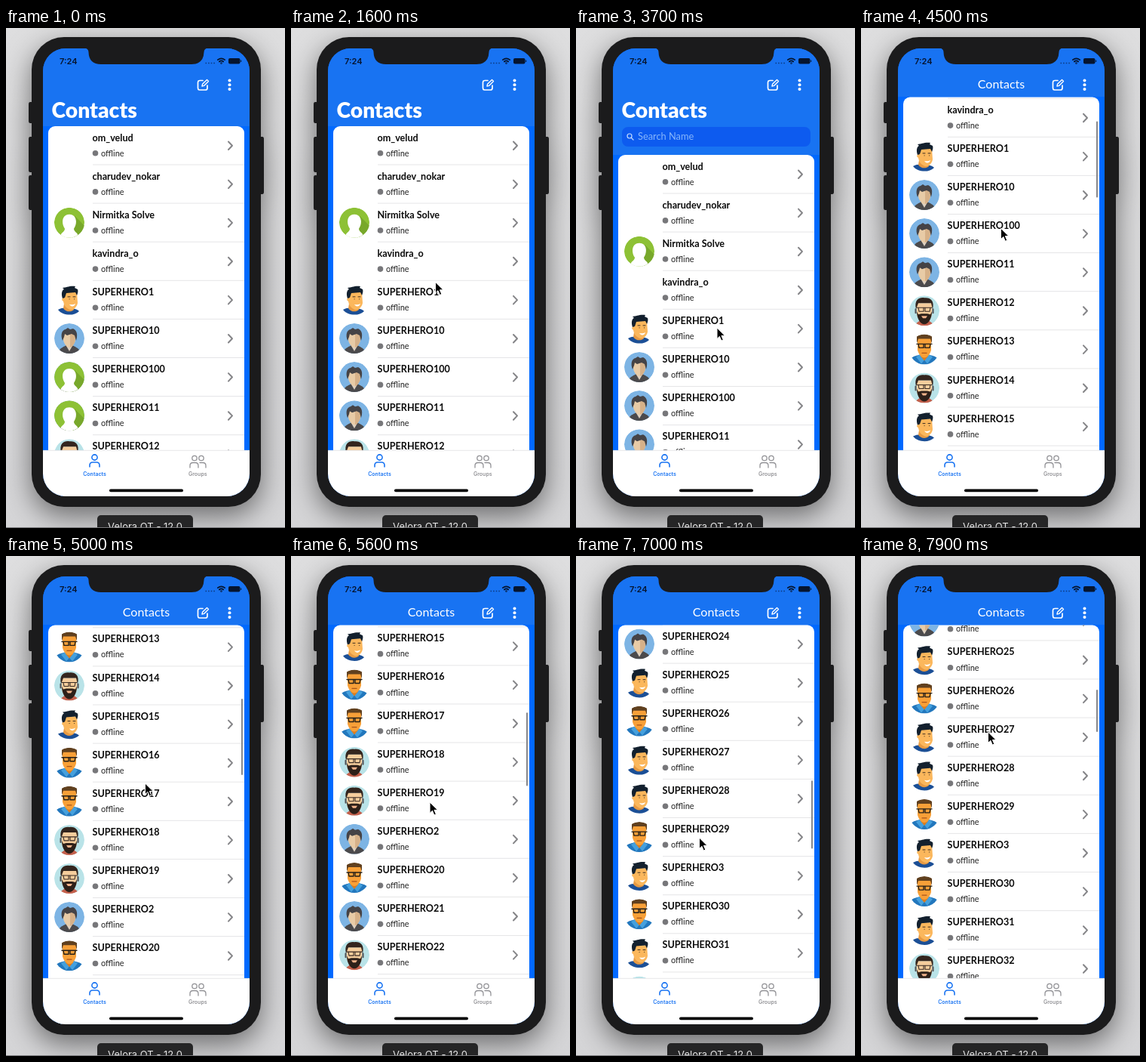
An HTML page that plays this animation: 370x662 px, repeating every 8000 ms.

```html
<!DOCTYPE html>
<html lang="en">
<head>
<meta charset="utf-8">
<title>Contacts list</title>
<style>
html, body { margin: 0; width: 100%; height: 100%; overflow: hidden; background: #dcdcde; }
svg { display: block; width: 370px; height: 662px; font-family: Lato, "Open Sans", sans-serif; }
.phone { filter: drop-shadow(0 12px 18px rgba(0, 0, 0, .5)); }
.line { fill: none; stroke-linecap: round; stroke-linejoin: round; }
.name { font-size: 12.6px; font-weight: 700; fill: #0b0b0b; }
.state { font-size: 11px; fill: #222; }
.tab { font: 600 7px Inter, sans-serif; text-anchor: middle; }
</style>
</head>
<body>
<svg viewBox="0 0 370 662">
  <defs>
    <clipPath id="screen"><rect x="49" y="27" width="274" height="593" rx="30"/></clipPath>
    <clipPath id="card"><rect id="cardBox" x="56" width="260" height="600" rx="9"/></clipPath>
    <clipPath id="belowNav"><rect x="49" y="91" width="274" height="120"/></clipPath>
    <clipPath id="disc"><circle r="20"/></clipPath>

    <g id="blank" clip-path="url(#disc)">
      <circle r="20" fill="#8dc135"/>
      <path d="M7-9 20 4V20H4Z" fill="#78a82b"/>
      <path d="M-12 20C-12 12-6 13-6 8C-11 1-10-11 0-11S11 1 6 8C6 13 12 12 12 20Z" fill="#fff"/>
    </g>

    <g id="suit" clip-path="url(#disc)">
      <circle r="20" fill="#7db4e4"/>
      <path d="M-14 20C-14 12-8 12-4 9H4C8 12 14 12 14 20Z" fill="#4b4a4c"/>
      <path d="M-4 7H4V10L0 17-4 10Z" fill="#ddd0c0"/>
      <path d="M-8-6H8V2C7 8 3 12 0 12S-7 8-8 2Z" fill="#e8cba6"/>
      <path d="M1-6H8V2C7 8 3 12 1 12Z" fill="#d6b189"/>
      <path d="M-9 3C-12-5-10-11-5-12L-2-14 1-12 5-13C11-10 11-4 9 3L7-4 3-6-3-4-6-6-7-2Z" fill="#454346"/>
    </g>

    <g id="hero">
      <path d="M-15 13C-10 9 9 10 13 15C6 22-9 21-15 13Z" fill="#1b4f96"/>
      <path d="M-7 5H5L6 13C2 17-5 16-8 11Z" fill="#e79a43"/>
      <path d="M-8-10 10-10 11 4C10 10 5 14 1 13C-4 11-7 8-8 2L-10 0-9-3Z" fill="#fbb75c"/>
      <path d="M-9-2C-11-8-10-13-7-14L-9-16C-4-16 0-19 8-18L7-16 11-14C12-11 11-9 10-6L8-10-4-9-6-3Z" fill="#13202e"/>
      <path d="M-2-4 1-4M5-4 8-4M0-1H.2M6.500-1H6.700" class="line" stroke="#3a2c20"/>
      <path d="M0 6C4 7 6 6 8 5C7 9 3 10 0 6Z" fill="#fff"/>
    </g>

    <g id="glasses" clip-path="url(#disc)">
      <path d="M-20 20C-20 9-12 9-6 7H6C12 9 20 9 20 20Z" fill="#2277bd"/>
      <path d="M-6 7-11 10-4 19 0 14 4 19 11 10 6 7Z" fill="#45a0dd"/>
      <path d="M-5 4H5V9L0 15-5 9Z" fill="#dc7d1e"/>
      <path d="M-9-15H9V1C7 8 3 11 0 11S-7 8-9 1Z" fill="#f8a038"/>
      <path d="M-10-8V-17C-5-21 5-21 10-17V-8L8-14H-8Z" fill="#60401f"/>
      <path d="M-8-7H-1V-2H-7ZM1-7H8L7-2H1ZM-10-7H10" class="line" stroke="#252019" stroke-width="1.4"/>
      <path d="M-3 5H3" class="line" stroke="#a9551b" stroke-width="1.2"/>
    </g>

    <g id="beard" clip-path="url(#disc)">
      <circle r="20" fill="#b9e3e8"/>
      <path d="M-12 20C-11 15-6 14-4 12H4C6 14 11 15 12 20Z" fill="#c4604c"/>
      <path d="M-10-10H10V5C8 12 4 15 0 15S-8 12-10 5Z" fill="#f5cd9c"/>
      <path d="M-10 1-8 5-4 4H4L8 5 10 1C10 11 5 18 0 18S-10 11-10 1Z" fill="#2d2019"/>
      <path d="M-4 7H4L2 10H-2Z" fill="#f1b38b"/>
      <path d="M-11-2C-14-15-6-18 0-17C7-18 14-14 11-2L9-10-8-10Z" fill="#33251e"/>
      <path d="M-8-4H-1V1H-7ZM1-4H8L7 1H1ZM-10-4H10" class="line" stroke="#382b24" stroke-width="1.1"/>
      <path d="M-11.500-2V3M11.500-2V3" class="line" stroke="#4d4c4f" stroke-width="2"/>
    </g>

    <linearGradient id="wall" x2="0" y2="1">
      <stop stop-color="#dededf"/><stop offset="1" stop-color="#d5d5d7"/>
    </linearGradient>
  </defs>

  <rect width="370" height="662" fill="url(#wall)"/>
  <g class="phone" fill="#1b1b1c">
    <rect x="34" y="12" width="304" height="622" rx="43"/>
    <path d="M34 98h-2q-2 0-2 3v22q0 3 2 3h2ZM34 144h-2q-2 0-2 3v41q0 3 2 3h2ZM34 195h-2q-2 0-2 3v40q0 3 2 3h2ZM337 144h3q2 0 2 3v70q0 3-2 3h-3Z"/>
  </g>

  <g clip-path="url(#screen)">
    <rect x="49" y="27" width="274" height="593" fill="#0069ff"/>
    <g clip-path="url(#card)">
      <rect x="56" y="80" width="261" height="500" fill="#fff"/>
      <g id="list"></g>
    </g>
    <rect id="header" x="49" y="27" width="274" fill="#1873f2"/>
    <rect id="bar" x="312" width="2" rx="1" fill="#87878a"/>
    <g clip-path="url(#belowNav)">
      <text id="bigTitle" x="60.500" font-size="28.300" font-weight="900" fill="#fff">Contacts</text>
    </g>
    <g id="search">
      <rect id="searchBox" x="61" width="250" rx="8" fill="#0d5bef"/>
      <g id="searchText">
        <g class="line" stroke="#c3dcff" stroke-width="1.2"><circle cx="71" cy="12" r="3"/><path d="M73.300 14.300 76 17"/></g>
        <text x="82" y="17.300" font-size="12.800" fill="#86b6fb">Search Name</text>
      </g>
    </g>
    <text id="navTitle" x="186" y="80" font-size="16" text-anchor="middle" fill="#fff">Contacts</text>
    <g class="line" stroke="#fff" stroke-width="1.7">
      <path d="M261 69.500H257Q254.500 69.500 254.500 72V79.500Q254.500 82 257 82H264.500Q267 82 267 79.500V76"/>
      <path d="M260 77 260.600 74.300 266.500 68.400 268.500 70.400 262.600 76.400Z" stroke-width="1.400"/>
    </g>
    <g fill="#fff"><circle cx="296.500" cy="69.500" r="2"/><circle cx="296.500" cy="75.300" r="2"/><circle cx="296.500" cy="81" r="2"/></g>

    <text x="71" y="48" font-family="Inter, sans-serif" font-size="11" font-weight="600" fill="#06152f">7:24</text>
    <path d="M264.500 46.500H277" stroke="#0c3a80" stroke-width="1.6" stroke-dasharray="1.6 2"/>
    <g class="line" stroke="#06152f" stroke-width="1.7"><path d="M280.800 42.200Q285.500 38.400 290.200 42.200M282.800 44.500Q285.500 42.400 288.200 44.500"/><circle cx="285.500" cy="46.500" r=".4"/></g>
    <rect x="295" y="40" width="15.500" height="7.500" rx="2" fill="#06152f"/>
    <path d="M311.700 42.500V45" stroke="#06152f"/>

    <rect x="49" y="559" width="274" height="61" fill="#fff"/>
    <path d="M49 559.300H323" stroke="#d5d5d8" stroke-width=".6"/>
    <g class="line" stroke="#1873f2" stroke-width="1.6">
      <circle cx="117.500" cy="568.500" r="3.600"/><path d="M111 581V579Q111 575 115 575H120Q124 575 124 579V581"/>
    </g>
    <g class="line" stroke="#929296" stroke-width="1.3">
      <circle cx="250" cy="569.500" r="3.200"/><circle cx="259" cy="569.500" r="3.200"/>
      <path d="M244 582V579.500Q244 575.500 248 575.500H251Q255 575.500 255 579.500V582M257 575.500H261Q265 575.500 265 579.500V582"/>
    </g>
    <text class="tab" x="117.500" y="592.700" fill="#1873f2">Contacts</text>
    <text class="tab" x="254.300" y="592.700" fill="#929296">Groups</text>
    <rect x="137" y="610.500" width="98" height="3.700" rx="1.800"/>
  </g>
  <path d="M103 26Q109.500 27 109.500 32Q110 48 126 48H246Q262 48 262.500 32Q262.500 27 269 26Z" fill="#1b1b1c"/>

  <rect x="121" y="645" width="127" height="30" rx="5" fill="#252526"/>
  <text x="184.500" y="665" font-family="Inter, sans-serif" font-size="13" text-anchor="middle" fill="#e6e6e6">Velora QT - 12.0</text>
  <rect y="661" width="370" height="1" fill="#77777a"/>
  <path id="cursor" d="M0 0V14.500L3.400 11.300 5.800 17 8.300 16 5.900 10.400H10.500Z" stroke="#fff" stroke-width="1"/>
</svg>
<script>
const LOOP = 8000, STEP = 100, ROW = 51.1, NAV = 91, TITLE = 130, FULL = 168, BOTTOM = 559;
const $ = id => document.getElementById(id);
const set = (id, attrs) => { for (const k in attrs) $(id).setAttribute(k, attrs[k]); };
const clamp = (v, a, b) => Math.min(b, Math.max(a, v));

const heroes = [1, 10, 100, 11, 12, 13, 14, 15, 16, 17, 18, 19, 2, 20, 21, 22, 23, 24,
  25, 26, 27, 28, 29, 3, 30, 31, 32, 33];
const names = ["om_velud", "charudev_nokar", "Nirmitka Solve", "kavindra_o", ...heroes.map(n => "SUPERHERO" + n)];
const faces = { p: "blank", s: "suit", h: "hero", g: "glasses", b: "beard" };
const looks = "--p-hsssbgbhggbbsgsbbshghhghghbh";

const face = (kind, extra = "") => kind in faces ? `<use href="#${faces[kind]}" x="84" y="25.500" ${extra}/>` : "";
$("list").innerHTML = names.map((name, i) => `<g transform="translate(0 ${i * ROW})">
  ${face(looks[i])}${i === 6 || i === 7 ? face("p", 'class="loading"') : ""}
  <text class="name" x="114.500" y="19.500">${name}</text>
  <circle cx="118.500" cy="35.800" r="3.800" fill="#77777a"/>
  <text class="state" x="126" y="39.600">offline</text>
  <path class="line" d="M295 20.500 300 25.700 295 31" stroke="#858588" stroke-width="2"/>
  <path d="M115 51H316" stroke="#e2e2e5" stroke-width=".9"/></g>`).join("");

// Monotone cubic through [time, value] keys
function curve(keys) {
  const slope = i => keys[i + 1] ? (keys[i + 1][1] - keys[i][1]) / (keys[i + 1][0] - keys[i][0]) : 0;
  const tangent = i => {
    if (!i) return 0;
    const a = slope(i - 1), b = slope(i);
    return a * b > 0 ? 2 * a * b / (a + b) : 0;
  };
  return t => {
    if (t <= keys[0][0]) return keys[0][1];
    const i = keys.findLastIndex(k => k[0] <= t);
    if (i === keys.length - 1) return keys[i][1];
    const [t0, a] = keys[i], [t1, b] = keys[i + 1], d = t1 - t0, u = (t - t0) / d, w = 1 - u;
    return w * w * (1 + 2 * u) * a + u * u * (3 - 2 * u) * b + d * u * w * (w * tangent(i) - u * tangent(i + 1));
  };
}

const listTop = curve([[2300, 130], [2800, 185], [3000, 190], [3500, 168], [4100, 168], [4500, -60],
  [5000, -365], [5500, -455], [5700, -485], [6200, -746.7], [6600, -835], [7000, -982], [7600, -1012.2]]);
const mouseX = curve([[900, 215], [1800, 188], [3700, 187], [5000, 184.5], [6200, 183.5], [7000, 163.5], [7600, 168.5]]);
const mouseY = curve([[900, 450], [1800, 320], [2300, 320], [2800, 391], [3100, 420], [3700, 397], [4200, 401],
  [4600, 240], [5000, 301], [5500, 370], [5800, 200], [6200, 249], [6700, 420], [7000, 373], [7600, 233]]);
const barAlpha = curve([[2300, 0], [2500, 1], [3200, 1], [3600, 0], [4100, 0], [4300, 1]]);

function draw(t) {
  const y = listTop(t), head = Math.max(y, NAV), over = Math.max(0, y - FULL);
  set("list", { transform: `translate(0 ${y})` });
  set("cardBox", { y: clamp(y, NAV + .5, FULL) });
  set("header", { height: head - 27 });
  set("bigTitle", { y: 118.5 + over + Math.min(0, y - TITLE) });
  set("navTitle", { opacity: clamp((112 - y) / 20, 0, 1) });

  const reveal = clamp((y - TITLE) / (FULL - TITLE), 0, 1);
  set("search", { transform: `translate(0 ${131 + over})`, opacity: Math.min(1, reveal * 4) });
  set("searchBox", { height: 26 * reveal });
  set("searchText", { opacity: clamp(reveal * 3 - 2, 0, 1), transform: `translate(0 ${13 * (reveal - 1)})` });

  // The thumb shrinks when more rows have been fetched
  const view = BOTTOM + 1 - head, content = 2180 + clamp((t - 5000) * .13, 0, 260);
  const fetched = clamp((t - 7700) / 200, 0, 1), mix = (a, b) => a + (b - a) * fetched;
  const top = y > NAV ? head + 3 : NAV + (NAV - y) / content * view;
  set("bar", { y: mix(top, 177), height: mix(view * view / content - over * .6, 56), opacity: barAlpha(t) });

  document.querySelectorAll(".loading").forEach(e => e.setAttribute("opacity", clamp(1 - t / 600, 0, 1)));
  set("cursor", { transform: `translate(${mouseX(t)} ${mouseY(t)})`, opacity: +(t >= 1000) });
}

const start = performance.now();
function tick() {
  const t = (performance.now() - start) % LOOP;
  draw(Math.floor(t / STEP) * STEP);
  requestAnimationFrame(tick);
}
tick();
</script>
</body>
</html>
```
